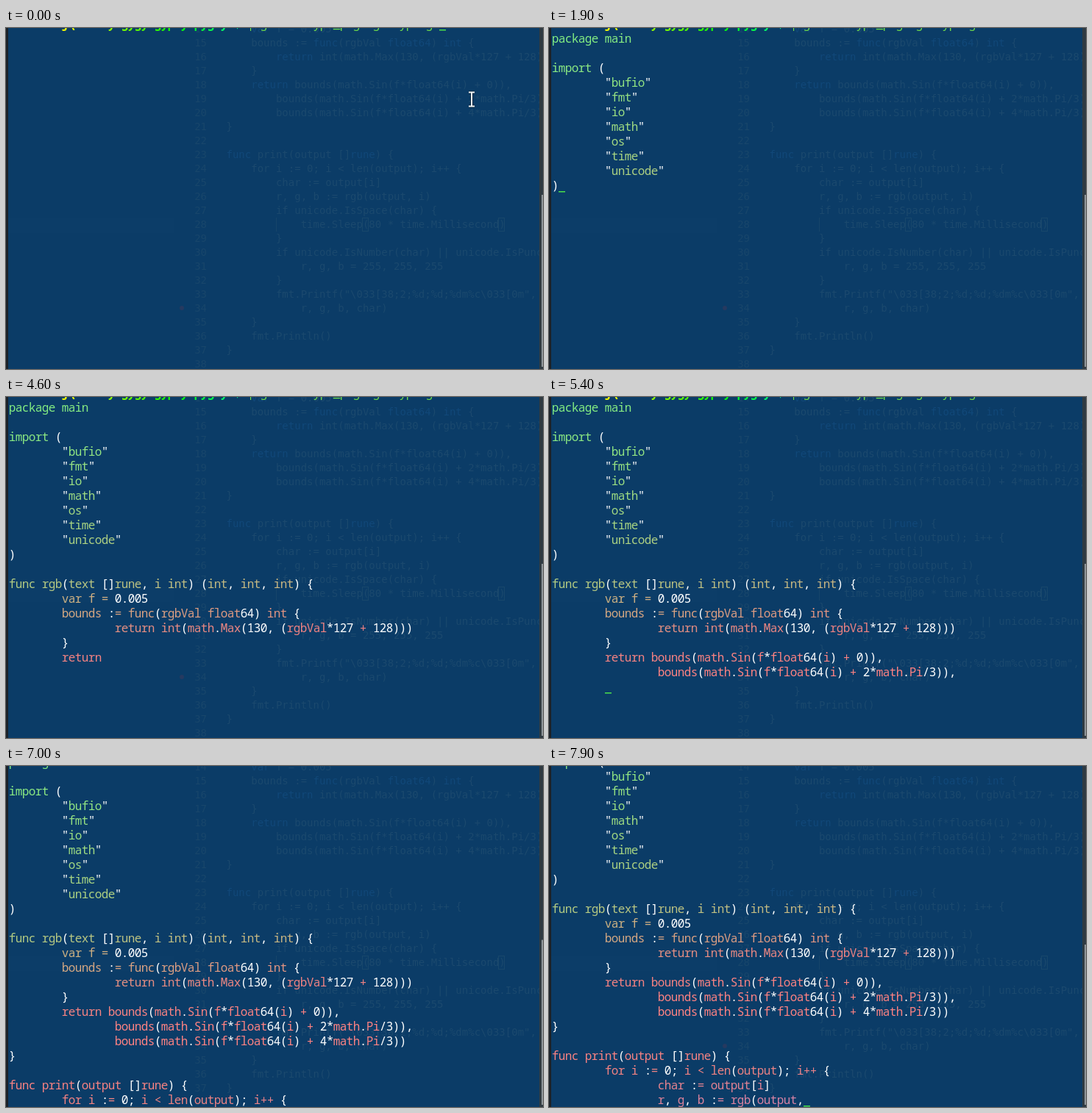
An HTML page with a canvas that plays this animation: 730 by 464 pixels, repeating every 8 s.

```html
<!DOCTYPE html>
<html lang="en">
<head>
<meta charset="utf-8">
<title>Rainbow typing terminal</title>
<style>
  html, body { margin: 0; width: 100%; height: 100%; overflow: hidden; background: #0b3c67; }
  canvas { display: block; }
</style>
</head>
<body>
<canvas id="stage" width="730" height="464"></canvas>
<script>
const ctx = document.getElementById('stage').getContext('2d');
const W = 730, H = 464, LOOP = 8000, TICK = 100;
const CELL = 9, ROW = 20, LEFT = 4, BASE = 20, LAST_ROW = 22;

const source = String.raw`package main

import (
	"bufio"
	"fmt"
	"io"
	"math"
	"os"
	"time"
	"unicode"
)

func rgb(text []rune, i int) (int, int, int) {
	var f = 0.005
	bounds := func(rgbVal float64) int {
		return int(math.Max(130, (rgbVal*127 + 128)))
	}
	return bounds(math.Sin(f*float64(i) + 0)),
		bounds(math.Sin(f*float64(i) + 2*math.Pi/3)),
		bounds(math.Sin(f*float64(i) + 4*math.Pi/3))
}

func print(output []rune) {
	for i := 0; i < len(output); i++ {
		char := output[i]
		r, g, b := rgb(output, i)
		if unicode.IsSpace(char) {
			time.Sleep(80 * time.Millisecond)
		}
		if unicode.IsNumber(char) || unicode.IsPunct(char) {
			r, g, b = 255, 255, 255
		}
		fmt.Printf("\033[38;2;%d;%d;%dm%c\033[0m",
			r, g, b, char)
	}
	fmt.Println()
}
`;

// The typist pauses before every whitespace character.
const chunks = source.match(/\s?\S+|\s/g);

// [ms, chunks typed]: the pace wavers a little.
const pace = [
  [300, -0.9], [400, 0.2], [700, 4.1], [800, 4.5], [900, 6.2], [1200, 10.1], [1400, 12.3],
  [1900, 19.2], [2200, 22.2], [3100, 33.2], [3200, 34.5], [3300, 35.4], [3500, 39.2],
  [4200, 47.2], [4400, 49.05], [4600, 52.2], [4800, 55.1], [4900, 56.3], [5000, 58.2],
  [5800, 66.3], [5900, 68.2], [6200, 71.1], [6300, 71.25], [6400, 73.2], [7000, 81.2],
  [7200, 84.1], [7900, 93.3]
];

function progressAt(t) {
  if (t <= pace[0][0]) return pace[0][1];
  const k = pace.findIndex(p => p[0] >= t);
  const [t0, n0] = pace[k - 1], [t1, n1] = pace[k];
  return n0 + (n1 - n0) * (t - t0) / (t1 - t0);
}

function rainbow(i) {
  const channel = phase => Math.floor(Math.max(130, Math.sin(0.005 * i + phase) * 127 + 128));
  return `rgb(${[0, 2, 4].map(k => channel(k * Math.PI / 3))})`;
}

function rect(color, x, y, w, h) {
  ctx.fillStyle = color;
  ctx.fillRect(x, y, w, h);
}

function drawCell(char, col, row, color) {
  ctx.fillStyle = color;
  ctx.fillText(char, LEFT + (col + 0.5) * CELL, BASE + row * ROW);
}

// Editor window shining faintly through the terminal.
function drawEditor() {
  const keyword = /\b(func|var|return|float64(?!\(i)|int(?!\()|rune)\b/;
  const lines = source.split('\n');
  rect('rgba(255,255,255,.005)', 0, 258, 228, 21);
  ctx.font = '14px "DejaVu Sans Mono", monospace';
  const advance = ctx.measureText('0').width;
  for (let n = 14; n <= 38; n++) {
    const y = 25 + (n - 15) * 19;
    ctx.textAlign = 'right';
    ctx.fillStyle = '#18466b';
    ctx.fillText(n, 273, y);
    ctx.textAlign = 'left';
    let x = 299.5;
    for (const part of (lines[n - 1] || '').replace(/\t/g, '    ').split(keyword)) {
      ctx.fillStyle = /^(func|var|return|float64|int|rune)$/.test(part) ? '#114879' : '#1b496e';
      ctx.fillText(part, x, y);
      x += part.length * advance;
    }
  }
  ctx.strokeStyle = '#18476b';
  ctx.lineWidth = 1;
  for (const x of [484.5, 669.5]) ctx.strokeRect(x, 258.5, 8, 18);
  rect('#17456a', 367, 258, 1, 19);
  ctx.fillStyle = '#263a60';
  ctx.beginPath();
  ctx.arc(239, 381, 3, 0, 2 * Math.PI);
  ctx.fill();
}

function drawPrompt(scroll) {
  const path = 'jQ mossy gygy/gypsy/pygmy $ ';
  const command = '| go run type_page.go typing ';
  ctx.font = 'bold 16px "Noto Sans Mono", monospace';
  [...path].forEach((c, i) => drawCell(c, 8 + i, -1 - scroll, `hsl(${62 + i * 3.4},95%,50%)`));
  ctx.font = '16px "Noto Sans Mono", monospace';
  [...command].forEach((c, i) => drawCell(c, 36 + i, -1 - scroll, '#6fdc4c'));
}

function drawTerminal(progress) {
  const typed = chunks.slice(0, Math.floor(progress) + 1).join('');
  let row = typed ? 0 : -1, col = typed ? 0 : 65;
  const cells = [];
  [...typed].forEach((char, i) => {
    if (char === '\n') { row++; col = 0; }
    else if (char === '\t') col += 8 - col % 8;
    else {
      if (char !== ' ') cells.push([char, col, row, /[\p{P}\p{N}]/u.test(char) ? '#fff' : rainbow(i)]);
      col++;
    }
  });
  const scroll = Math.max(0, row - LAST_ROW);
  ctx.textAlign = 'center';
  drawPrompt(scroll);
  for (const [char, c, r, color] of cells) drawCell(char, c, r - scroll, color);

  const cursorOn = Math.floor((progress - 4.7) / 7.4) & 1;
  if (cursorOn) rect('#4be04b', LEFT + col * CELL, BASE + (row - scroll) * ROW + 2, CELL, 1.5);

  const thumbTop = 227 + 3.2 * Math.max(0, row - 20);
  rect('#2f3a42', 725, 0, 5, H);
  rect('#8f9498', 728, thumbTop, 2, 461 - thumbTop);
}

function drawPointer() {
  const beam = (color, width) => {
    ctx.strokeStyle = color;
    ctx.lineWidth = width;
    ctx.beginPath();
    ctx.moveTo(629, 87.5); ctx.lineTo(637, 87.5);
    ctx.moveTo(633, 87.5); ctx.lineTo(633, 106.5);
    ctx.moveTo(629, 106.5); ctx.lineTo(637, 106.5);
    ctx.stroke();
  };
  beam('rgba(0,0,0,.4)', 4);
  beam('#eef2f4', 2);
}

function frame(now) {
  const t = Math.floor(now % LOOP / TICK) * TICK;
  rect('#0b3c67', 0, 0, W, H);
  drawEditor();
  rect('#1c2228', 0, 0, 3, H);
  drawTerminal(progressAt(t));
  if (t < 200) drawPointer();
  requestAnimationFrame(frame);
}
requestAnimationFrame(frame);
</script>
</body>
</html>
```
